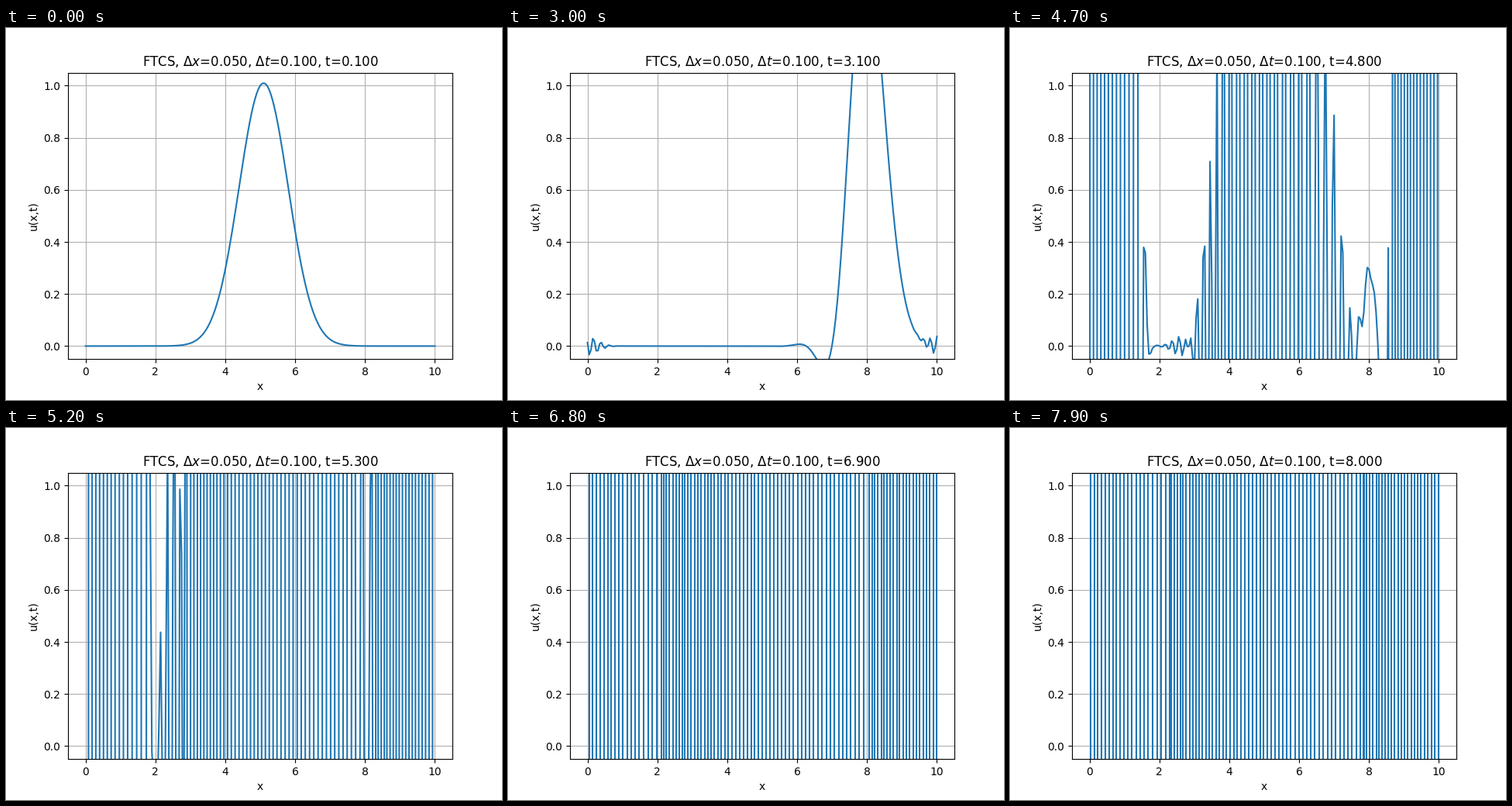
Animation, 640 px wide and 480 px high, one loop 8 s. Source, as a matplotlib script:

```python
import numpy as np
import matplotlib.pyplot as plt
from matplotlib.animation import FuncAnimation

LENGTH, CELLS = 10.0, 200
SPEED, DT, STEPS = 1.0, 0.1, 80

x = np.linspace(0, LENGTH, CELLS + 1)
dx = x[1] - x[0]
courant = SPEED * DT / dx


def ftcs(u):
    """Forward-time, centred-space advection step with wrapped ends."""
    return u - 0.5 * courant * (np.roll(u, -1) - np.roll(u, 1))


# The scheme is unstable, so the ripples grow out of rounding and the wrap kink.
states = [np.exp(-(x - LENGTH / 2) ** 2)]
for _ in range(STEPS):
    states.append(ftcs(states[-1]))

fig, ax = plt.subplots(figsize=(6.4, 4.8), dpi=100)
line, = ax.plot(x, states[0])
ax.set_xlim(-0.5, 10.5)
ax.set_ylim(-0.05, 1.05)
ax.set_xlabel("x")
ax.set_ylabel("u(x,t)")
ax.grid(True)
title = ax.set_title("")


def update(i):
    n = i + 1
    line.set_ydata(states[n])
    title.set_text(
        rf"FTCS, $\Delta x$={dx:.3f}, $\Delta t$={DT:.3f}, t={n * DT:.3f}"
    )
    return line, title


anim = FuncAnimation(fig, update, frames=STEPS, interval=100,
                     repeat=True, repeat_delay=0, blit=False)
plt.show()
```
